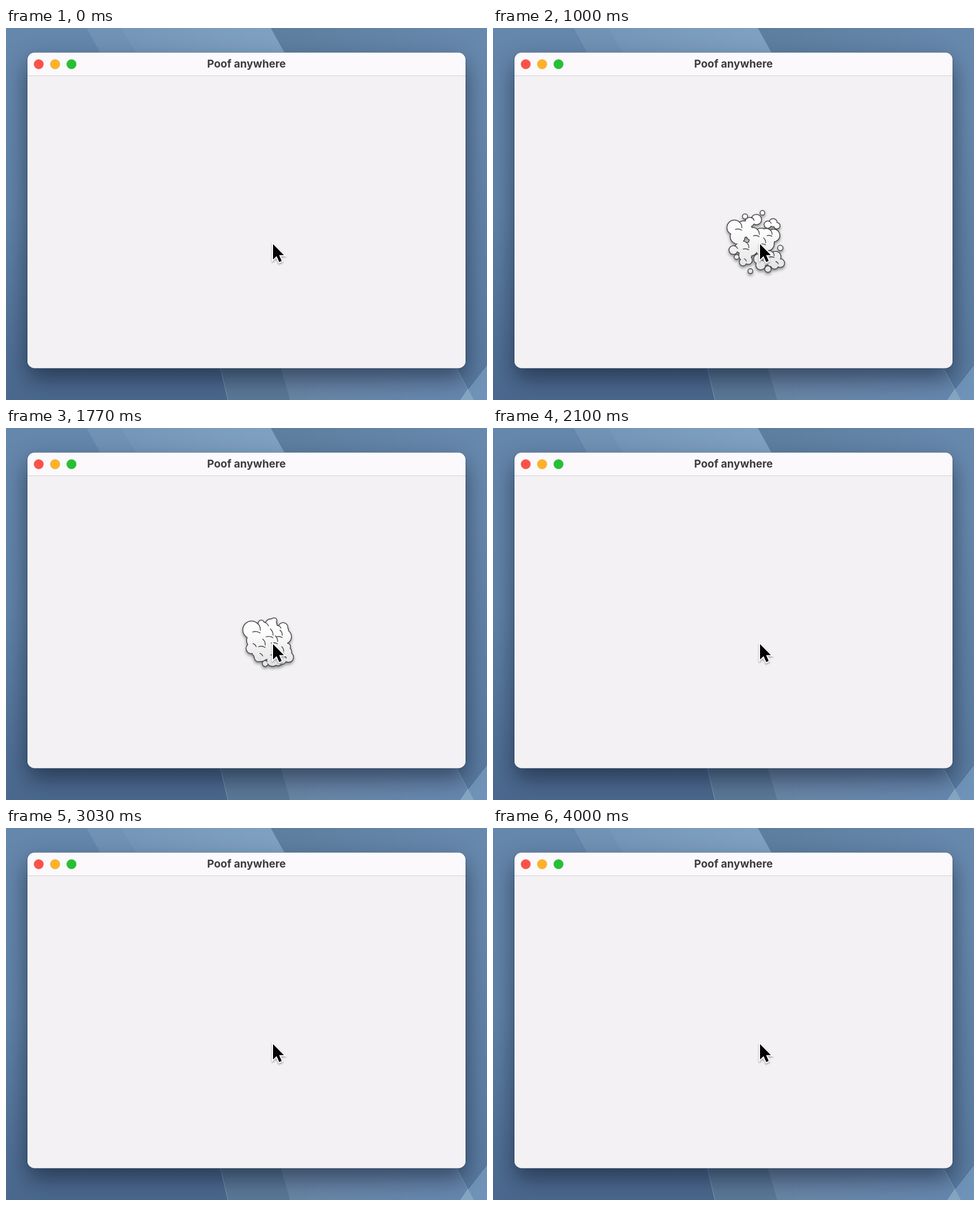
Write an HTML page with a canvas that moves like this. It is 852x658 px and loops after 4030 ms.

```html
<!DOCTYPE html>
<html lang="en">
<head>
<meta charset="utf-8">
<title>Poof anywhere</title>
<style>
  html, body { margin: 0; width: 100%; height: 100%; overflow: hidden; }
  #stage { position: relative; width: 852px; height: 658px; overflow: hidden; }
  #stage > * { position: absolute; left: 0; top: 0; }
  #stage > .shadow {
    left: 38px; top: 44px; width: 776px; height: 557px; border-radius: 12px;
    box-shadow: 0 0 1px 0.5px rgba(0, 10, 30, .4), 0 19px 42px rgba(0, 8, 25, .5);
  }
  .title { font: 700 19px Inter, sans-serif; text-anchor: middle; fill: #3c3b3d; }
  .light { stroke: #000; stroke-opacity: .1; }
  .cursor { filter: drop-shadow(0 2px 1.5px rgba(0, 0, 0, .35)); }
</style>
</head>
<body>
<div id="stage">
  <svg width="852" height="658">
    <defs>
      <linearGradient id="sky" x2="0" y2="1">
        <stop stop-color="#6587ac"/><stop offset=".5" stop-color="#6083a8"/><stop offset="1" stop-color="#4a688d"/>
      </linearGradient>
      <linearGradient id="east">
        <stop stop-color="#5d7e9e"/><stop offset="1" stop-color="#6789ae"/>
      </linearGradient>
      <linearGradient id="dusk" x2="0" y2="1">
        <stop offset=".2" stop-color="#0a2850" stop-opacity="0"/><stop offset="1" stop-color="#0a2850" stop-opacity=".16"/>
      </linearGradient>
      <linearGradient id="band">
        <stop stop-color="#7496b8"/><stop offset="1" stop-color="#80a2c2"/>
      </linearGradient>
      <linearGradient id="floor">
        <stop stop-color="#6986a6"/><stop offset="1" stop-color="#6788b0"/>
      </linearGradient>
    </defs>
    <rect width="852" height="658" fill="url(#sky)"/>
    <path id="slope" d="M469 0H852V658H780Z" fill="url(#east)"/>
    <path d="M469 0H852V658H780Z" fill="url(#dusk)"/>
    <path d="M143 0H203L229 43H166Z" fill="#7092b4"/>
    <path d="M203 0H469L493 43H229Z" fill="url(#band)"/>
    <path d="M380 602H487L503 658H393Z" fill="#5a7998"/>
    <path d="M487 602H798L828 658H503Z" fill="url(#floor)"/>
    <path d="M852 598V658H805Z" fill="#7094b9"/>
    <path d="M818 638L828 658H805Z" fill="#86a6c3"/>
    <path d="M380 602L393 658M798 602L828 658M852 598L805 658" fill="none" stroke="#91b2cd" stroke-opacity=".65"/>
  </svg>
  <div class="shadow"></div>
  <svg width="852" height="658">
    <rect x="38" y="43.5" width="776" height="558" rx="12.5" fill="#fbf9fc"/>
    <path d="M38 85H814V589A12.5 12.5 0 0 1 801.5 601.5H50.5A12.5 12.5 0 0 1 38 589Z" fill="#f3f1f4"/>
    <path d="M38 84.5H814" stroke="#d0cfd1"/>
    <circle class="light" cx="58" cy="64" r="8.6" fill="#ff5149"/>
    <circle class="light" cx="87" cy="64" r="8.6" fill="#ffb225"/>
    <circle class="light" cx="116" cy="64" r="8.6" fill="#25c132"/>
    <text class="title" x="426" y="70">Poof anywhere</text>
  </svg>
  <canvas id="poof" width="852" height="658"></canvas>
  <svg class="cursor" width="852" height="658">
    <path d="M473 382.3V409.5L479.3 403.6L484 414L488.3 412L483.8 401.8H492.2Z" stroke="#fff" stroke-width="4" paint-order="stroke"/>
  </svg>
</div>
<script>
const LOOP = 4030, FIRST = 90, PERIOD = 806, STEP = 79, STEPS = 5;
const CENTER = { x: 468, y: 379 };
const TILT = -0.35;
const INK = '#4a494b';

// Larger puffs: x, y, radius.
const PUFFS = [
  [423, 352, 15.5], [458, 327, 10], [500, 334, 8], [466, 367, 14],
  [498, 366, 12], [418, 395, 9.5], [441, 399, 13.5], [482, 387, 13],
  [504, 417, 10.5], [517, 432, 8.5], [478, 425, 10.5], [440, 425, 8]
].map(([x, y, r]) => ({ x, y, lobes: makeLobes(r) }));

// Single dots drift on an upright ellipse around the cloud.
for (let i = 0; i < 8; i++) {
  const a = 0.19 - i * 0.768;
  PUFFS.push({
    x: CENTER.x + 57 * Math.cos(a),
    y: CENTER.y + 73 * Math.sin(a),
    lobes: [{ x: 0, y: 0, r: 3.7 + 0.6 * Math.sin(i * 2) }]
  });
}

function makeLobes(r) {
  const count = r > 10 ? 3 : 2;
  return Array.from({ length: count }, (_, i) => {
    const a = TILT + i * 2 * Math.PI / count;
    return { x: r * .42 * Math.cos(a), y: r * .42 * Math.sin(a), r: r * (i ? .6 : .66) };
  });
}

const ctx = document.getElementById('poof').getContext('2d');

function fillLobes(lobes, inset) {
  ctx.beginPath();
  for (const { x, y, r } of lobes) {
    const radius = Math.max(.5, r - inset);
    ctx.moveTo(x + radius, y);
    ctx.arc(x, y, radius, 0, Math.PI * 2);
  }
  ctx.fill();
}

// A short crease continues a side lobe's outline into the main lobe.
function drawCreases([main, ...sides]) {
  for (const { x, y, r } of sides) {
    const dx = main.x - x, dy = main.y - y, d = Math.hypot(dx, dy);
    const cos = (d * d + r * r - main.r * main.r) / (2 * d * r);
    const start = Math.atan2(dy, dx) - Math.acos(cos);
    ctx.beginPath();
    ctx.arc(x, y, r - .7, start, start + .9);
    ctx.stroke();
  }
}

function drawCloud(puffs) {
  const lobes = puffs.flat();
  const top = Math.min(...lobes.map(l => l.y - l.r));
  const bottom = Math.max(...lobes.map(l => l.y + l.r));
  ctx.save();
  ctx.shadowColor = 'rgba(0,0,0,.42)';
  ctx.shadowBlur = 5;
  ctx.shadowOffsetY = 3;
  ctx.fillStyle = INK;
  fillLobes(lobes, 0);
  ctx.restore();
  const shade = ctx.createLinearGradient(0, top, 0, bottom);
  shade.addColorStop(.3, '#fdfdfd');
  shade.addColorStop(1, '#e2e1e3');
  ctx.fillStyle = shade;
  fillLobes(lobes, 1.5);
  ctx.strokeStyle = INK;
  ctx.lineWidth = 1.4;
  ctx.lineCap = 'round';
  puffs.forEach(drawCreases);
}

// The cloud spreads with an ease-out while its puffs shrink evenly.
function drawStep(step) {
  ctx.clearRect(0, 0, 852, 658);
  if (step < 0) return;
  const p = step / (STEPS - 1);
  const spread = .54 + .5 * Math.sin(p * Math.PI / 2);
  const size = 1.75 - p;
  const puffs = PUFFS.map(puff => puff.lobes.map(({ x, y, r }) => ({
    x: CENTER.x + (puff.x - CENTER.x) * spread + x * size,
    y: CENTER.y + (puff.y - CENTER.y) * spread + y * size,
    r: r * size
  })));
  if (p < .5) drawCloud(puffs);
  else puffs.forEach(puff => drawCloud([puff]));
}

function stepAt(t) {
  const step = Math.floor((t - FIRST) % PERIOD / STEP);
  return t >= FIRST && step < STEPS ? step : -1;
}

const begin = performance.now();
let shown = -1;
function tick() {
  const step = stepAt((performance.now() - begin) % LOOP);
  if (step !== shown) drawStep(shown = step);
  requestAnimationFrame(tick);
}
tick();
</script>
</body>
</html>
```
